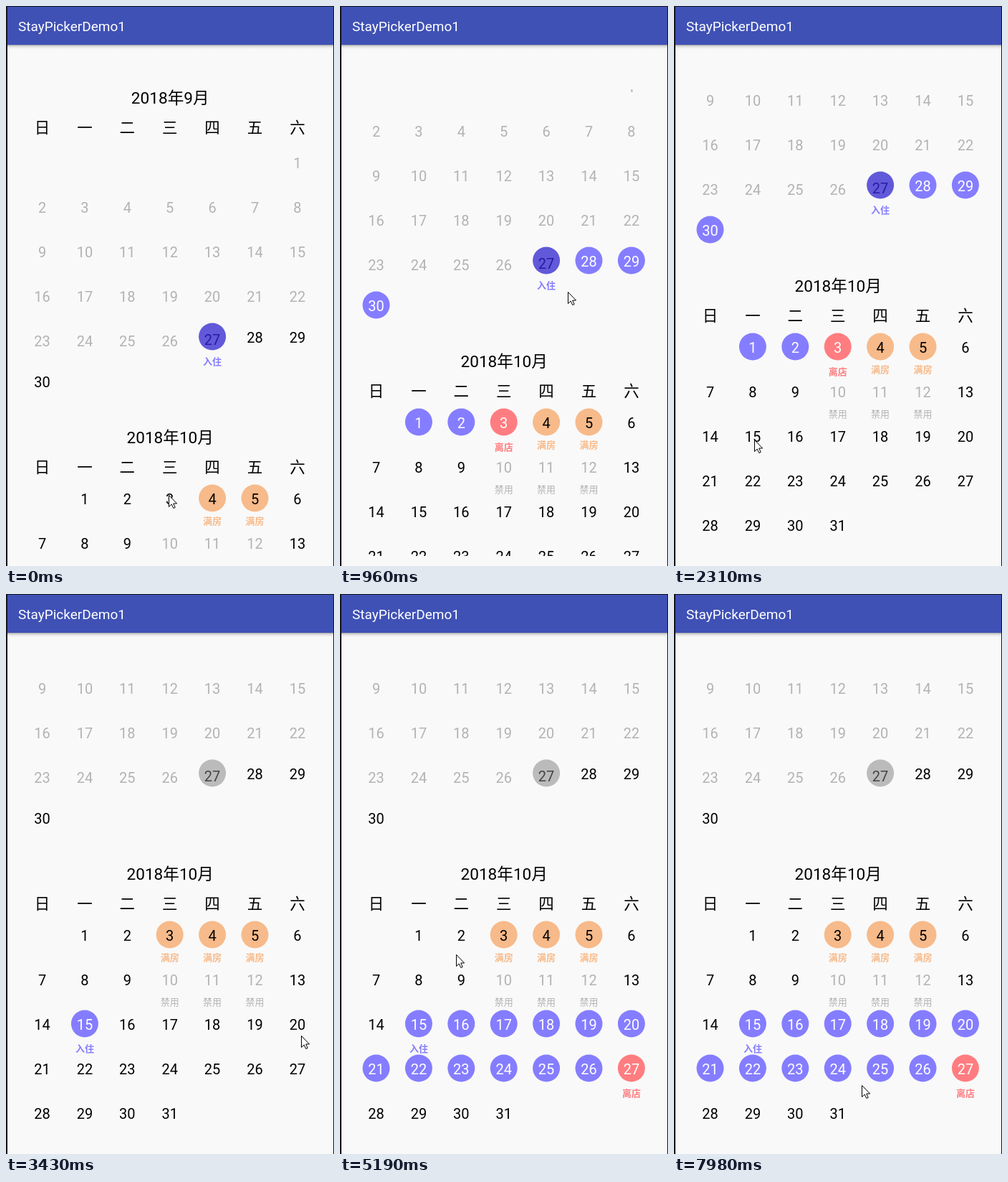
An HTML page with a canvas for the animation above (8 s loop, 458x780 px).

```html
<!DOCTYPE html>
<html lang="zh-CN">
<head>
<meta charset="utf-8">
<style>
html, body { margin: 0; width: 100%; height: 100%; overflow: hidden; background: #f9f9f9; }
canvas { display: block; }
</style>
</head>
<body>
<canvas id="stage" width="458" height="780"></canvas>
<script>
const ctx = document.getElementById('stage').getContext('2d');
const FONT = 'Roboto, "Noto Sans CJK SC", "Noto Sans CJK", sans-serif';
const LOOP = 8000, TICK = 120;
const SCROLL = 211, DRAG_START = 840, DRAG_END = 1080;
const PURPLE = '#857dff', RED = '#ff7d80', ORANGE = '#f7ba8a', GRAY = '#b3b3b3';

// Pointer moves: start time, end time, destination
const moves = [
  [240, 840, 315, 496],
  [DRAG_START, DRAG_END, 320, 299],
  [1200, 2280, 112, 604],
  [2640, 3360, 412, 615],
  [3480, 3840, 405, 654],
  [4500, 5400, 110, 470],
  [6480, 6840, 58, 571],
  [7080, 7320, 56, 586],
  [7620, 7920, 262, 684]
];

function ease(t, from, to) {
  const f = Math.min(1, Math.max(0, (t - from) / (to - from)));
  return f * f * (3 - 2 * f);
}

function pointerAt(t) {
  let x = 227, y = 681;
  for (const [from, to, nx, ny] of moves) {
    const f = ease(t, from, to);
    x += (nx - x) * f;
    y += (ny - y) * f;
  }
  return [x, y];
}

// Selected stay, in days counted from 1 September
function stayAt(t) {
  if (t < 240) return [27, 27];
  if (t < 2520) return [27, 33];
  return [45, t < 4080 ? 45 : 57];
}

function text(s, x, y, size, color, weight = 400, align = 'center') {
  ctx.font = `${weight} ${size}px ${FONT}`;
  ctx.textAlign = align;
  ctx.fillStyle = color;
  ctx.fillText(s, x, y);
}

const colX = c => 50.5 + 59.4 * c;

// n counts from 1 September, d is the day of the month
function drawDay(n, d, x, y, [start, end]) {
  const today = n === 27, past = n < 27;
  const off = n >= 40 && n <= 42;
  const full = n === 34 || n === 35 || n === 33 && start > n;
  let fill, label, tone, color = '#000', weight = 700, drop = 38;

  if (past || off) color = GRAY;
  if (off) [label, tone, weight, drop] = ['禁用', GRAY, 400, 35];
  if (full) [fill, label, tone, drop] = [ORANGE, '满房', ORANGE, 35];
  if (today) [fill, color] = ['#bbb', '#444'];
  if (n >= start && n <= end) {
    [fill, color] = [PURPLE, '#fff'];
    if (n === start) [label, tone] = ['入住', PURPLE];
    else if (n === end) [fill, label, tone] = [RED, '离店', RED];
    if (today) [fill, color] = ['#6159d9', '#2a1aa6'];
  }

  if (fill) {
    ctx.fillStyle = fill;
    ctx.beginPath();
    ctx.arc(x, y - 1, 19, 0, 2 * Math.PI);
    ctx.fill();
  }
  text(d, x, y + 7 + (past ? 5 : today ? 3 : 0), 20, color);
  if (label) text(label, x, y + drop, 13, tone, weight);
}

function drawMonth(month, offset, y, stay) {
  const first = new Date(2018, month - 1, 1).getDay();
  const days = new Date(2018, month, 0).getDate();
  text(`2018年${month}月`, 229.2, y + 8, 22.6, '#000');
  [...'日一二三四五六'].forEach((s, c) => text(s, colX(c), y + 48.5, 21.5, '#000'));
  for (let d = 1; d <= days; d++) {
    const cell = first + d - 1;
    drawDay(offset + d, d, colX(cell % 7), y + 85.5 + 62 * Math.floor(cell / 7), stay);
  }
}

// Line at the list's lower edge when the scroll hits its end
function drawGlow(t) {
  if (t < DRAG_END) return;
  const g = ctx.createLinearGradient(23, 0, 438, 0);
  g.addColorStop(0, '#c4c4c400');
  g.addColorStop(0.1, '#c4c4c4');
  g.addColorStop(0.9, '#c4c4c4');
  g.addColorStop(1, '#c4c4c400');
  ctx.globalAlpha = 1 - ease(t, DRAG_END, DRAG_END + 600);
  ctx.fillStyle = g;
  ctx.fillRect(23, 765, 415, 1);
  ctx.globalAlpha = 1;
}

function drawHeader() {
  const g = ctx.createLinearGradient(0, 54, 0, 60);
  g.addColorStop(0, 'rgba(0,0,0,.35)');
  g.addColorStop(0.4, 'rgba(0,0,0,.1)');
  g.addColorStop(1, 'rgba(0,0,0,0)');
  ctx.fillStyle = g;
  ctx.fillRect(0, 54, 458, 6);
  ctx.fillStyle = '#3f51b5';
  ctx.fillRect(0, 0, 458, 54);
  text('StayPickerDemo1', 17, 34.5, 19, '#fff', 400, 'left');
  ctx.fillStyle = '#15151a';
  ctx.fillRect(0, 0, 458, 1);
  ctx.fillRect(0, 0, 2, 780);
  ctx.fillRect(457, 0, 1, 780);
}

const arrow = new Path2D('M.5 .5V16.5L4.2 13 6.8 18.5 9.2 17.4 6.7 12H11.6Z');

function drawPointer(x, y) {
  ctx.save();
  ctx.translate(Math.round(x), Math.round(y));
  ctx.fillStyle = '#fff';
  ctx.strokeStyle = '#000';
  ctx.fill(arrow);
  ctx.stroke(arrow);
  ctx.restore();
}

function draw(now) {
  const phase = now % LOOP;
  const t = phase - phase % TICK; // the screen updates in steps
  const stay = stayAt(t);

  ctx.fillStyle = '#f9f9f9';
  ctx.fillRect(0, 0, 458, 780);
  ctx.save();
  ctx.beginPath();
  ctx.rect(21, 116, 417, 650);
  ctx.clip();
  ctx.translate(0, -Math.round(SCROLL * ease(t, DRAG_START, DRAG_END)));
  drawMonth(9, 0, 128, stay);
  drawMonth(10, 30, 601, stay);
  ctx.restore();

  drawGlow(t);
  drawHeader();
  drawPointer(...pointerAt(t));
}

const origin = performance.now();
function loop() {
  draw(performance.now() - origin);
  requestAnimationFrame(loop);
}
loop();
</script>
</body>
</html>
```
